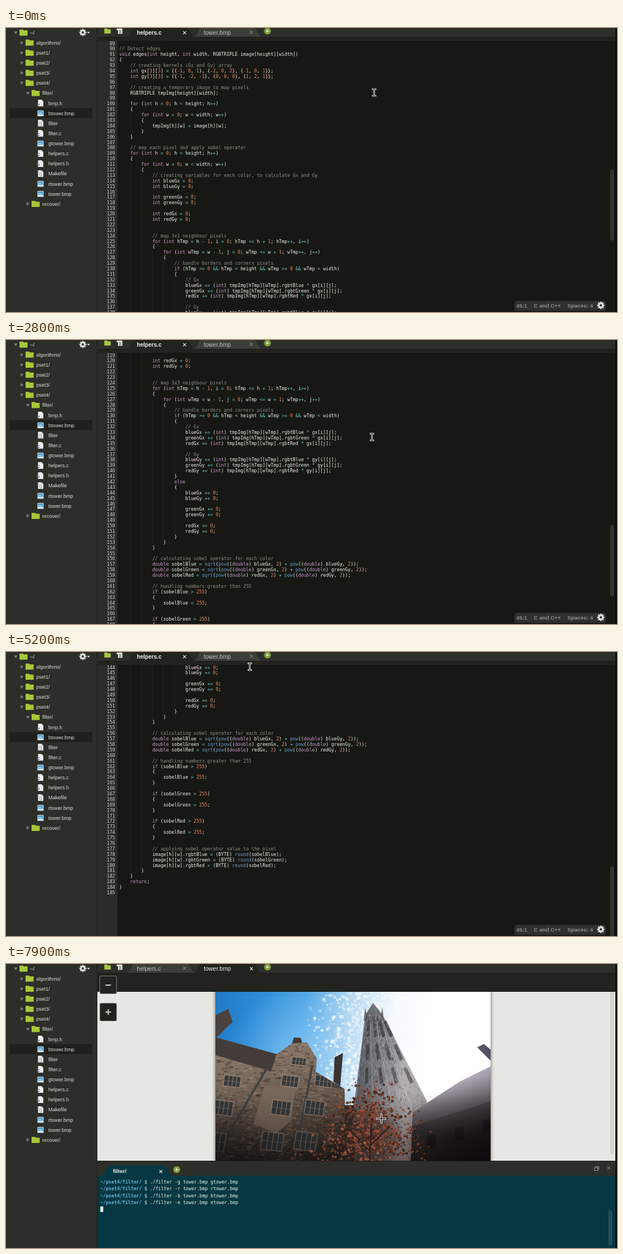
Animation of 1097x511 px, one loop 8 s. Source, as an HTML page with a canvas:

```html
<!DOCTYPE html>
<html lang="en">
<head>
<meta charset="utf-8">
<title>Code editor</title>
<style>
html, body { margin: 0; width: 100%; height: 100%; overflow: hidden; background: #2d2e2a; }
canvas { display: block; }
</style>
</head>
<body>
<canvas id="stage" width="1097" height="511"></canvas>
<script>
const W = 1097, H = 511, LOOP = 8000, EDGE = 1094;
const MONO = '8.22px "DejaVu Sans Mono", monospace';
const SANS = '"Liberation Sans", Arial, sans-serif';
const CHAR = 4.945, LINE = 9.89, FIRST = 89;
const DARK = '#171813', PANEL = '#2d2e2a', BAR = '#22231e', TEAL = '#053842', GREEN = '#a6c83a';
const stage = document.getElementById('stage').getContext('2d');
let g = stage;

const code = `
// Detect edges
void edges(int height, int width, RGBTRIPLE image[height][width])
{
    // creating kernels (Gx and Gy) array
    int gx[3][3] = {{-1, 0, 1}, {-2, 0, 2}, {-1, 0, 1}};
    int gy[3][3] = {{-1, -2, -1}, {0, 0, 0}, {1, 2, 1}};

    // creating a temporary image to map pixels
    RGBTRIPLE tmpImg[height][width];

    for (int h = 0; h < height; h++)
    {
        for (int w = 0; w < width; w++)
        {
            tmpImg[h][w] = image[h][w];
        }
    }

    // map each pixel and apply sobel operator
    for (int h = 0; h < height; h++)
    {
        for (int w = 0; w < width; w++)
        {
            // creating variables for each color, to calculate Gx and Gy
            int blueGx = 0;
            int blueGy = 0;

            int greenGx = 0;
            int greenGy = 0;

            int redGx = 0;
            int redGy = 0;


            // map 3x3 neighbour pixels
            for (int hTmp = h - 1, i = 0; hTmp <= h + 1; hTmp++, i++)
            {
                for (int wTmp = w - 1, j = 0; wTmp <= w + 1; wTmp++, j++)
                {
                    // handle borders and corners pixels
                    if (hTmp >= 0 && hTmp < height && wTmp >= 0 && wTmp < width)
                    {
                        // Gx
                        blueGx += (int) tmpImg[hTmp][wTmp].rgbtBlue * gx[i][j];
                        greenGx += (int) tmpImg[hTmp][wTmp].rgbtGreen * gx[i][j];
                        redGx += (int) tmpImg[hTmp][wTmp].rgbtRed * gx[i][j];

                        // Gy
                        blueGy += (int) tmpImg[hTmp][wTmp].rgbtBlue * gy[i][j];
                        greenGy += (int) tmpImg[hTmp][wTmp].rgbtGreen * gy[i][j];
                        redGy += (int) tmpImg[hTmp][wTmp].rgbtRed * gy[i][j];
                    }
                    else
                    {
                        blueGx += 0;
                        blueGy += 0;

                        greenGx += 0;
                        greenGy += 0;

                        redGx += 0;
                        redGy += 0;
                    }
                }
            }

            // calculating sobel operator for each color
            double sobelBlue = sqrt(pow((double) blueGx, 2) + pow((double) blueGy, 2));
            double sobelGreen = sqrt(pow((double) greenGx, 2) + pow((double) greenGy, 2));
            double sobelRed = sqrt(pow((double) redGx, 2) + pow((double) redGy, 2));

            // handling numbers greater than 255
            if (sobelBlue > 255)
            {
                sobelBlue = 255;
            }

            if (sobelGreen > 255)
            {
                sobelGreen = 255;
            }

            if (sobelRed > 255)
            {
                sobelRed = 255;
            }

            // applying sobel operator value to the pixel
            image[h][w].rgbtBlue = (BYTE) round(sobelBlue);
            image[h][w].rgbtGreen = (BYTE) round(sobelGreen);
            image[h][w].rgbtRed = (BYTE) round(sobelRed);
        }
    }
    return;
}
`.split('\n');

const TOKEN = /(\/\/.*)|\b(void|int|for|if|else|double|return)\b|\b(sqrt|pow|round)\b|(-?\d+)|([-+*<>=&]+)|\w+|[^\s\w]/g;
const COLORS = ['#8f8f88', '#cc99cc', '#6699cc', '#f5865a', '#66cccc'];

// Lines become lists of [column, text, color]; blank lines keep the indent above them.
let depth = 0;
const lines = code.map(text => {
  if (text) depth = text.search(/\S/);
  const tokens = [...text.matchAll(TOKEN)].map(m => {
    const kind = m.slice(1).findIndex(Boolean);
    return [m.index, m[0], COLORS[kind] || '#f0f0ea'];
  });
  return { depth, tokens };
});

function rect(x, y, w, h, fill) { g.fillStyle = fill; g.fillRect(x, y, w, h); }
function text(s, x, y, font, fill, align = 'left') {
  g.font = font; g.fillStyle = fill; g.textAlign = align; g.fillText(s, x, y);
}
function poly(fill, ...p) {
  g.fillStyle = fill; g.beginPath();
  for (let i = 0; i < p.length; i += 2) g.lineTo(p[i], p[i + 1]);
  g.closePath(); g.fill();
}
function disc(x, y, r, fill) {
  g.fillStyle = fill; g.beginPath(); g.arc(x, y, r, 0, 7); g.fill();
}
function round(x, y, w, h, r, fill, edge) {
  g.beginPath(); g.roundRect(x, y, w, h, r);
  g.fillStyle = fill; g.fill();
  if (edge) { g.lineWidth = 1; g.strokeStyle = edge; g.stroke(); }
}
function pill(x, y, w, h, fill, edge) { round(x + .5, y + .5, w - 1, h - 1, 2.5, fill, edge); }
function strokes(color, width, ...segs) {
  g.strokeStyle = color; g.lineWidth = width; g.beginPath();
  for (const [a, b, c, d] of segs) { g.moveTo(a, b); g.lineTo(c, d); }
  g.stroke();
}
function cross(x, y, on) {
  const r = 2.6;
  strokes(on ? '#f0f0ec' : '#85867f', on ? 1.3 : 1.1, [x - r, y - r, x + r, y + r], [x - r, y + r, x + r, y - r]);
}
function plus(x, y, r, color, width) {
  strokes(color, width, [x - r, y, x + r, y], [x, y - r, x, y + r]);
}
function addButton(x, y) {
  disc(x, y, 6.2, '#7c9a35');
  plus(x, y, 3, '#eef2dc', 1.5);
}
function gear(x, y, r, hole) {
  for (let i = 0; i < 4; i++) {
    const c = Math.cos(i * Math.PI / 4) * r, s = Math.sin(i * Math.PI / 4) * r;
    strokes('#deded8', r * .45, [x - c, y - s, x + c, y + s]);
  }
  disc(x, y, r * .72, '#deded8');
  disc(x, y, r * .32, hole);
}
function folder(x, y, s = 1) {
  round(x, y - 5.5 * s, 7 * s, 5 * s, 1, GREEN);
  round(x, y - 4 * s, 14.5 * s, 9.5 * s, 1, GREEN);
}
function arrow(x, y, open) {
  if (open) poly('#7d7e79', x - 3.2, y - 2, x + 3.2, y - 2, x, y + 3);
  else poly('#7d7e79', x - 2, y - 3.2, x + 3, y, x - 2, y + 3.2);
}
function fileIcon(x, y, name) {
  if (name.endsWith('.bmp')) {
    rect(x - 5.5, y - 5, 11, 10.5, '#d5e7f2');
    rect(x - 4.5, y - 4, 9, 6, '#4f9dc9');
    rect(x - 3.5, y - 1, 6, 2, '#a9d3ea');
    return;
  }
  poly('#f0f0ee', x - 4.5, y - 6, x + 2, y - 6, x + 5, y - 3, x + 5, y + 6, x - 4.5, y + 6);
  poly('#b5b5b2', x + 2, y - 6, x + 5, y - 3, x + 2, y - 3);
  const ext = name.match(/\.([ch])$/);
  if (ext) text(ext[1] === 'c' ? 'C' : 'h', x - 6.5, y + 4.5, 'bold 8px ' + SANS, '#2f6fa8');
  else for (let i = -2; i < 5; i += 2) rect(x - 3, y + i, 6, .8, '#9a9a98');
}

// A leading dot marks each level, a plus sign an open folder.
const tree = ('+~/ .algorithms/ .pset1/ .pset2/ .pset3/ .+pset4/ ..+filter/ ...bmp.h ...btower.bmp ...filter ' +
  '...filter.c ...gtower.bmp ...helpers.c ...helpers.h ...Makefile ...rtower.bmp ...tower.bmp ..recover/').split(' ');
function sidebar() {
  rect(0, 0, 164, H, PANEL);
  rect(163, 0, 1, H, '#1c1d1a');
  rect(7, 144, 148, 18, '#1f201c');
  tree.forEach((entry, i) => {
    const [, dots, open, name] = entry.match(/^(\.*)(\+?)(.*)/);
    const y = 8.2 + i * 18.13, shift = dots.length * 10.8;
    if (!name.endsWith('/')) fileIcon(62, y, name);
    else {
      arrow(17.5 + shift, y, open);
      folder(24.3 + shift, y);
    }
    text(name, 43.5 + shift, y + 3.4, '9px ' + SANS, '#dcdcd8');
  });
  gear(138, 8, 6.3, PANEL);
  poly('#deded8', 145.5, 7, 150.5, 7, 148, 10);
}

function tabShape(a, b, top, bottom, fill) {
  g.beginPath();
  g.moveTo(a, bottom);
  g.bezierCurveTo(a + 13, bottom, a + 10, top, a + 23, top);
  g.lineTo(b - 23, top);
  g.bezierCurveTo(b - 10, top, b - 13, bottom, b, bottom);
  g.fillStyle = fill; g.fill();
}
function tabs(active, focused) {
  rect(164, 0, W - 164, 17, PANEL);
  rect(164, 16, W - 164, 1, DARK);
  folder(176.5, 5.5, .8);
  round(198.5, 1, 9, 3, 1, '#dcdcd6');
  round(201, 1, 8, 9.5, 1, '#dcdcd6');
  for (let y = 4; y < 9; y += 2) rect(203, y, 4, .8, '#55564f');
  const names = ['helpers.c', 'tower.bmp'];
  for (const i of [1 - active, active]) {
    const on = i === active, x = 214 + i * 120;
    tabShape(x, x + 128, -4, on ? 17 : 16, on ? BAR : '#3d3e3a');
    text(names[i], x + 21, 11.8, on && focused ? 'bold 10.1px ' + SANS : '10.6px ' + SANS, on ? '#f2f2ee' : '#c0c0ba');
    cross(x + 106.7, on ? 8.5 : 7.5, on);
  }
  addButton(469.5, 5.5);
}

function editor(top) {
  rect(164, 17, W - 164, H - 17, BAR);
  rect(164, 23, 37, H, '#2b2c28');
  rect(200, 23, EDGE - 200, H, DARK);
  g.save();
  g.beginPath(); g.rect(164, 22, EDGE - 164, H); g.clip();
  for (let n = top; n < top + 50 && n - FIRST < lines.length; n++) {
    const y = 27.5 + (n - top) * LINE, line = lines[n - FIRST];
    text(n, 195.8, y + 3, MONO, '#d2d2cc', 'right');
    for (let c = 4; c < line.depth; c += 4) rect(Math.round(203 + c * CHAR), y - 5, 1, LINE, BAR);
    for (const [col, s, color] of line.tokens) text(s, 203.3 + col * CHAR, y + 3, MONO, color);
  }
  g.restore();
  pill(1085, Math.min(23 + (top - 1) * 2.63, 385.5), 6, 128, '#30312c', '#43443e');
  round(913, 491, 164, 18, 3, '#30312d');
  const font = 'bold 9.9px ' + SANS;
  text('45:1', 916, 502.5, font, '#90918b');
  text('C and C++', 947.5, 502.5, font, '#90918b');
  text('Spaces: 4', 1008, 502.5, font, '#90918b');
  gear(1068, 499, 6.5, '#30312d');
}

function gradient(x0, y0, x1, y1, ...colors) {
  const f = g.createLinearGradient(x0, y0, x1, y1);
  colors.forEach((c, i) => f.addColorStop(i / (colors.length - 1), c));
  return f;
}
function glow(x, y, r, rgb, alpha) {
  const f = g.createRadialGradient(x, y, 0, x, y, r);
  f.addColorStop(0, `rgba(${rgb},${alpha})`); f.addColorStop(1, `rgba(${rgb},0)`);
  rect(0, 0, 494, 330, f);
}
let seed = 7;
function rnd() { return (seed = seed * 16807 % 2147483647) / 2147483647; }
function spread(size) { return (rnd() + rnd() + rnd() - 1.5) * size; }

function sky() {
  rect(0, 0, 494, 330, gradient(0, 0, 400, 60, '#1f78c4', '#2f8cd8', '#4fa6e6', '#b4d8f2', '#f8fafc', '#ffffff'));
  glow(150, 130, 130, '150,208,248', .6);
  for (let i = 0; i < 900; i++) {
    const y = rnd() * 190, x = 272 - y * .15 + spread(75);
    disc(x, y, .6 + rnd() * 2.8, `rgba(246,250,253,${.2 + rnd() * .5})`);
  }
}
// The tower widens downwards; side 0 is its left edge and side 1 its right edge.
function towerX(side, y) {
  const left = 270 - (y - 40) * .11, right = 298 + (y - 45) * .51;
  return left + (right - left) * side;
}
function tower() {
  poly(gradient(250, 0, 385, 0, '#55565c', '#7d7d82', '#aaa6a8', '#8f8a8c'),
    towerX(0, 50), 50, 283, 28, towerX(1, 50), 50, towerX(1, 205), 205, 388, 330, 246, 330, 250, 205);
  for (let side = 0; side <= 1; side += .25) {
    const x = towerX(side, 48);
    poly('#5b5a60', x - 3, 60, x, 36, x + 3, 60);
    strokes('rgba(212,208,208,.3)', 1.4, [x, 48, towerX(side, 290), 290]);
  }
  for (let y = 62; y < 180; y += 42) {
    for (let side = .12; side < 1; side += .25) {
      const x = towerX(side, y), end = towerX(side, y + 28);
      poly('rgba(45,46,54,.6)', x, y, x + 5, y - 3, end + 6, y + 25, end, y + 28);
    }
  }
  for (let i = 0; i < 700; i++) {
    const y = 45 + rnd() * 190;
    rect(towerX(rnd() * .97, y), y, 1.5, 2 + rnd() * 4, rnd() < .55 ? 'rgba(30,30,36,.25)' : 'rgba(225,220,218,.2)');
  }
}
function rightWing() {
  poly(gradient(400, 165, 440, 330, '#9d97a8', '#625b64', '#39332f', '#171415'), 354, 225, 438, 170, 494, 142, 494, 330, 350, 330);
  poly('rgba(42,36,38,.5)', 354, 250, 494, 205, 494, 330, 350, 330);
  for (let x = 380; x < 494; x += 50) rect(x, 372 - x * .28, 16, 24, 'rgba(22,22,28,.6)');
  poly('#39344c', 470, 108, 482, 102, 494, 112, 494, 132);
}
function house() {
  poly('#4b423f', 0, 50, 23, 39, 31, 62, 0, 92);
  poly('#3a3433', 214, 126, 229, 118, 224, 178, 212, 170);
  poly('#453b36', 137, 102, 141, 90, 153, 91, 156, 100);
  g.save();
  g.beginPath();
  for (const [x, y] of [[0, 90], [110, 120], [137, 101], [164, 99], [182, 128], [180, 152], [232, 183], [234, 330], [0, 330]]) g.lineTo(x, y);
  g.clip();
  rect(0, 80, 240, 250, gradient(0, 95, 30, 330, '#8e7c6d', '#78685b', '#584a41', '#2c2522'));
  for (let i = 0; i < 1500; i++) {
    rect(rnd() * 234, 90 + rnd() * 240, 2 + rnd() * 7, 1 + rnd() * 3, rnd() < .5 ? 'rgba(30,24,22,.28)' : 'rgba(190,160,135,.2)');
  }
  poly('#443c39', 0, 88, 110, 120, 100, 151, 0, 122);
  poly('#47403e', 182, 150, 234, 183, 180, 176);
  poly('#77675a', 88, 178, 144, 178, 136, 240, 110, 262, 68, 246);
  strokes('#3f4244', 4, [92, 146, 2, 300], [174, 140, 138, 330]);
  for (let row = 0; row < 4; row++) {
    for (const x of row ? [46, 150, 210] : [150]) {
      leadedWindow(x - 16 * row, 133 + 30 * row + 6 * row * row, 24 + row * 4, 12 + row * 6);
    }
  }
  g.restore();
}
function leadedWindow(x, y, w, h) {
  g.save();
  g.translate(x, y); g.transform(1, .13, -.15, 1, 0, 0);
  rect(-w / 2 - 2, -h / 2 - 2, w + 4, h + 4, 'rgba(160,138,118,.55)');
  rect(-w / 2, -h / 2, w, h, '#34393d');
  for (let i = 1; i < 4; i++) rect(-w / 2 + w * i / 4, -h / 2, 1.2, h, '#8b7966');
  rect(-w / 2, 0, w, 1, '#766859');
  g.restore();
}
function autumnTree() {
  glow(278, 272, 62, '48,30,26', .9);
  for (let i = 0; i < 1300; i++) {
    const y = spread(78), x = spread(50 + (y + 70) * .5);
    disc(278 + x, 264 + y, .7 + rnd() * 2, `hsl(${10 + rnd() * 10},${30 + rnd() * 25}%,${17 + rnd() * 27}%)`);
  }
  strokes('#2b1d1a', 2, [276, 330, 280, 245], [277, 295, 245, 260], [278, 285, 313, 250]);
}
function paintPhoto() {
  const c = document.createElement('canvas');
  c.width = 494; c.height = 330;
  g = c.getContext('2d');
  sky();
  tower();
  rightWing();
  house();
  rect(232, 212, 18, 118, '#372f2c');
  glow(425, 150, 120, '255,255,255', .35);
  rect(0, 190, 494, 140, gradient(0, 190, 0, 330, 'rgba(10,8,8,0)', 'rgba(10,8,8,.5)'));
  autumnTree();
  glow(494, 330, 170, '8,6,8', .85);
  glow(0, 330, 130, '8,6,8', .5);
  g = stage;
  return c;
}
const photo = paintPhoto();

function viewer(bottom, label) {
  const open = bottom < H;
  rect(164, 50, EDGE - 164, H - 50, '#e6e7e2');
  g.save();
  g.beginPath(); g.rect(164, 50, EDGE - 164, bottom - 50); g.clip();
  g.shadowColor = 'rgba(0,0,0,.6)'; g.shadowBlur = 6;
  g.drawImage(photo, open ? 376 : 382, open ? Math.max(42, bottom / 2 - 141) : 113);
  g.restore();
  if (label) text('100%', 630, 66, 'bold 11px ' + SANS, '#dfe0dd', 'center');
  if (open) pill(1085, 44, 6, bottom - 56, '#d6d7d2', '#c2c3be');
  rect(164, 17, W - 164, 33, BAR);
  rect(164, 49, W - 164, 1, '#161712');
  for (const y of [21, 70]) pill(168, y, 31, 33, BAR, '#85867f');
  strokes('#d8d8d2', 2, [178.5, 38, 188.5, 38]);
  plus(183.5, 86.5, 5, '#d8d8d2', 2);
}

function terminal(top, t) {
  rect(164, top, W - 164, 28, PANEL);
  rect(164, top, W - 164, 1, '#1b1c18');
  rect(164, top + 27, EDGE - 164, H, TEAL);
  tabShape(167, 303, top + 8, top + 28, TEAL);
  text('filter/', 192, top + 22.2, 'bold 9.9px ' + SANS, '#f2f2ee');
  cross(278, top + 19.5, true);
  addButton(306.5, top + 16);
  g.lineWidth = 1; g.strokeStyle = '#92938d';
  g.strokeRect(1058.5, top + 10.5, 6, 5);
  rect(1056, top + 12, 7, 6, PANEL);
  g.strokeRect(1056.5, top + 12.5, 6, 5);
  cross(1082.5, top + 13, false);
  const left = 169.5;
  let x = left, y = top + 38.2;
  for (const f of 'grbe') {
    text('~/pset4/filter/', left, y + 3, 'bold ' + MONO, '#69b1d8');
    text('$', left + 16 * CHAR, y + 3, MONO, '#e8eeee');
    x = left + 18 * CHAR;
    if (f === 'e' && t < 7000) break;
    const command = `./filter -${f} tower.bmp ${f}tower.bmp`;
    text(command, x, y + 3, MONO, '#f2f5f5');
    x += command.length * CHAR;
    if (f !== 'e' || t >= 7900) { x = left; y += 12.25; }
  }
  rect(x, y - 5, 5, 10, '#f4f6f6');
  const thumb = 52 + (366 - top) * .92;
  if (thumb > 20) pill(1082, 449 - (366 - top) / 2, 6, thumb, '#1b4952', '#3c636b');
}

// Pointer moves: [start, end, x, y]
const moves = [
  [500, 900, 667, 128], [1000, 1200, 668, 135], [1400, 2100, 658.5, 174], [2700, 2800, 657, 174.5],
  [3000, 4200, 640, 172], [4200, 4800, 450, 9], [4800, 5000, 462, 35], [5100, 5400, 389, 9], [5400, 5900, 674, 278]
];
function pointerAt(t) {
  let x = 661, y = 116;
  for (const [from, to, nx, ny] of moves) {
    const f = Math.min(1, Math.max(0, (t - from) / (to - from)));
    x += (nx - x) * f;
    y += (ny - y) * f;
  }
  return [x, y];
}
function pointer(t) {
  const [x, y] = pointerAt(t), image = t >= 5400;
  if (image ? y < 113 : y < 23) {
    strokes('#fff', 4, [x + 4, y + 9, x + 7, y + 15]);
    poly('#fff', x - 1, y - 2, x - 1, y + 15, x + 11, y + 10.5);
    poly('#111', x, y + .5, x, y + 12.7, x + 8.5, y + 9.5);
    strokes('#111', 2, [x + 4, y + 9, x + 6.5, y + 14]);
    return;
  }
  const r = image ? 7 : 6;
  const bars = image
    ? [[x - r, y, x + r, y], [x, y - r, x, y + r]]
    : [[x - 2.5, y - r, x + 2.5, y - r], [x, y - r, x, y + r], [x - 2.5, y + r, x + 2.5, y + r]];
  g.lineCap = 'square';
  strokes('#fff', image ? 3.4 : 2.6, ...bars);
  strokes('#111', image ? 1.4 : .9, ...bars);
  g.lineCap = 'butt';
}

// Wheel notches in tenths of a second; each scrolls five lines.
const notches = [15, 16, 17, 22, 25, 26, 31, 31, 32, 38, 42];

function draw(now) {
  const t = Math.floor(now % LOOP / 100) * 100;
  const shown = t >= 5400, split = t >= 6100;
  const bottom = t >= 6300 ? 354 : t >= 6200 ? 366 : split ? 436 : H;
  rect(0, 0, W, H, PANEL);
  if (shown) viewer(bottom, t === 5400);
  else editor(FIRST + 5 * notches.filter(n => n * 100 <= t).length);
  tabs(shown ? 1 : 0, !split);
  if (split) terminal(bottom, t);
  rect(EDGE, 0, W - EDGE, H, '#0b0b0a');
  sidebar();
  pointer(t);
}

const start = performance.now();
function frame() {
  draw(performance.now() - start);
  requestAnimationFrame(frame);
}
frame();
</script>
</body>
</html>
```
